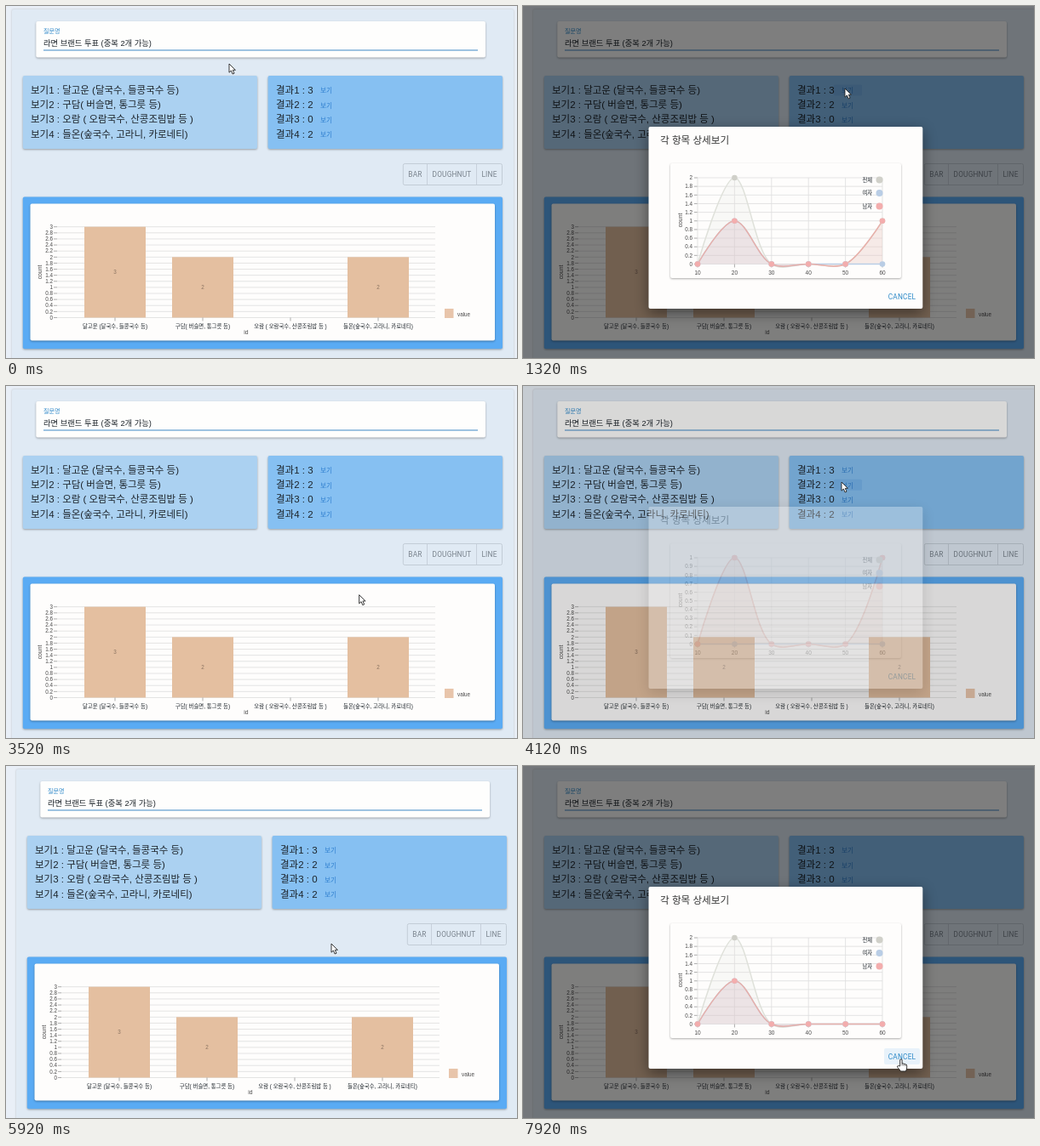
Animation, 600 px wide and 414 px high, one loop 8000 ms. Source, as an HTML page:

```html
<!DOCTYPE html>
<html lang="ko">
<head>
<meta charset="utf-8">
<title>투표 결과</title>
<style>
  html, body { margin: 0; width: 100%; height: 100%; overflow: hidden; background: #e9eff7; }
  svg { display: block; width: 600px; height: 414px; }
  text { font-family: "Liberation Sans", "Noto Sans CJK KR", "Noto Sans CJK JP", sans-serif; fill: #1d242b; }
  .num { fill: #4a4a4a; }
  .value { fill: #8d7562; }
  .btn { font-family: Roboto, sans-serif; letter-spacing: .2px; fill: #78828c; }
  .link { fill: #2f7fcf; }
  .blue { fill: #2a86c8; }
  .mid { text-anchor: middle; }
  .end { text-anchor: end; }
  .card { filter: drop-shadow(0 1px 1px rgba(0, 0, 0, .32)); }
  .paper { filter: drop-shadow(0 5px 8px rgba(0, 0, 0, .45)); }
  .soft { filter: drop-shadow(0 0 1px rgba(0, 0, 0, .2)); }
</style>
</head>
<body>
<svg viewBox="0 0 600 414">
  <g id="page"></g>
  <rect id="backdrop" width="600" height="414" opacity="0"/>
  <g id="dialog"></g>
  <g id="arrow">
    <path d="M0 0V10.2L2.4 8L4.1 12L6 11.2L4.3 7.3H7.4Z" fill="#fff" stroke="#222" stroke-width=".9" stroke-linejoin="round"/>
  </g>
  <g id="hand">
    <path d="M-1.3 8V1A1.2 1.2 0 0 1 1.1 1V5Q2.6 4.3 3.1 5.5Q4.6 4.9 5.1 6Q6.6 5.7 6.7 7.3V10Q6.5 12 5.4 14H-.6Q-2 11.6-4.4 9.2Q-4.9 7.6-3.3 7.6Z" fill="#fff" stroke="#222" stroke-width=".9" stroke-linejoin="round"/>
    <path d="M1.1 5V7.5M3.1 5.5V7.8M5.1 6V8" stroke="#222" stroke-width=".6"/>
  </g>
</svg>
<script>
const $ = id => document.getElementById(id);
const range = n => [...Array(n).keys()];
const text = (x, y, size, str, cls = '', more = '') =>
  `<text x="${x}" y="${y}" font-size="${size}" class="${cls}" ${more}>${str}</text>`;
const rect = (x, y, w, h, fill, more = '') =>
  `<rect x="${x}" y="${y}" width="${w}" height="${h}" fill="${fill}" ${more}/>`;
const line = (x1, y1, x2, y2, color, width = .85) =>
  `<path d="M${x1} ${y1}L${x2} ${y2}" stroke="${color}" stroke-width="${width}"/>`;
const dot = (x, y, r, fill) => `<circle cx="${x}" cy="${y}" r="${r}" fill="${fill}"/>`;
const side = (x, y) => text(0, 0, 6.8, 'count', 'num mid', `transform="translate(${x} ${y}) rotate(-90)"`);

const GRID = '#dfdfdf', TICK = '#8a8a8a', CARD = 'class="card" rx="2"';
const ROW = 17.3;
const options = [
  '달고운 (달국수, 들콩국수 등)',
  '구담( 버슬면, 통그릇 등)',
  '오람 ( 오람국수, 산콩조림밥 등 )',
  '들온(숲국수, 고라니, 카로네티)'
];
const votes = [3, 2, 0, 2];

function barChart() {
  const base = 366.5, unit = 35.6;
  let s = rect(28.5, 232.6, 545.5, 161, '#fefdfc', CARD);
  for (const i of range(16)) {
    const y = base - i * unit / 5;
    s += line(60, y, 504, y, GRID) + line(56, y, 60, y, TICK, .7);
    s += text(55, y + 2.2, 6.3, +(i / 5).toFixed(1), 'num end');
  }
  votes.forEach((v, i) => {
    const x = 128 + 103 * i;
    if (v) {
      s += rect(x - 36, base - v * unit, 72, v * unit, '#e4bfa0');
      s += text(x, base - v * unit / 2 + 2.2, 6.3, v, 'value mid');
    }
    s += line(x, base, x, base + 4, TICK, .7) + text(x, 379, 6.4, options[i], 'mid');
  });
  return s + side(42, 313) + text(282, 386, 6.8, 'id', 'num mid')
    + rect(515, 356, 10.5, 11, '#e8c5ab') + text(530, 364.5, 6.3, 'value', 'num');
}

function buildPage() {
  let s = rect(7, 4, 589, 420, '#e0eaf4', 'class="soft" rx="2"');
  s += rect(35.3, 18, 527.7, 42.6, '#fefefd', CARD);
  s += text(44, 32, 7, '질문명', 'blue') + text(44, 47.1, 9.3, '라면 브랜드 투표 (중복 2개 가능)');
  s += line(44, 52, 554, 52, '#3f88c5', 1);
  s += rect(19.8, 82, 275.2, 86, '#abd1f1', CARD) + rect(307.6, 82, 275.4, 86, '#86c0f2', CARD);
  s += rect(360, 93, 33, 13, '#2a78d2', 'id="hover" rx="1.5" opacity="0"');
  options.forEach((o, i) => {
    const y = 102.7 + ROW * i;
    s += text(29, y, 11.5, `보기${i + 1} : ${o}`);
    s += text(317, y, 11.5, `결과${i + 1} : ${votes[i]}`);
    s += text(376, y - .3, 7.6, '보기', 'link mid');
  });
  s += rect(466.3, 185.5, 116.2, 25, 'none', 'stroke="#c2ccd6" rx="2"');
  s += line(494.5, 186, 494.5, 210, '#c2ccd6') + line(552.5, 186, 552.5, 210, '#c2ccd6');
  s += text(480.5, 201, 8.3, 'BAR', 'btn mid') + text(523.5, 201, 8.3, 'DOUGHNUT', 'btn mid')
    + text(567.5, 201, 8.3, 'LINE', 'btn mid');
  return s + rect(19.8, 224.4, 563.2, 178.8, '#5aabf4', CARD) + barChart();
}

const X0 = 205, STEP = 43.4, Y0 = 303.5, HEIGHT = 101.5;

// Centripetal Catmull-Rom spline as cubic segments
function spline(pts) {
  const gap = (a, b) => Math.sqrt(Math.hypot(b[0] - a[0], b[1] - a[1]));
  const handle = (p, q, r) => {
    if (!r) return p;
    const a = gap(r, p), b = gap(p, q), n = 3 * a * (a + b);
    return [0, 1].map(k =>
      (p[k] * (2 * a * a + 3 * a * b + b * b) - r[k] * b * b + q[k] * a * a) / n);
  };
  return 'M' + pts[0] + pts.slice(1).map((q, i) =>
    `C${handle(pts[i], q, pts[i - 1])} ${handle(q, pts[i], pts[i + 2])} ${q}`).join('');
}

const series = [
  { name: '전체', dot: '#d0d0c9', line: '#dfe1da' },
  { name: '여자', dot: '#b9cde5', line: '#b9cde5' },
  { name: '남자', dot: '#f3adad', line: '#e9b0aa' }
];
// Counts at ages 20 and 60; the other ages are zero
const details = [
  { top: 2, at: [[2, 1], [1, 0], [1, 1]] },
  { top: 1, at: [[1, 1], [0, 0], [1, 1]] },
  { top: 2, at: [[2, 0], [1, 0], [1, 0]] }
];

function lineChart({ top, at }) {
  let s = '', areas = '', lines = '', dots = '';
  for (const i of range(11)) {
    const y = Y0 - i * HEIGHT / 10;
    s += line(X0, y, 422, y, GRID) + line(201, y, X0, y, TICK, .7);
    s += text(199, y + 2.2, 6.3, +(i * top / 10).toFixed(1), 'num end');
  }
  for (const i of range(6)) {
    const x = X0 + i * STEP;
    s += line(x, Y0 - HEIGHT, x, Y0, GRID) + line(x, Y0, x, Y0 + 4, TICK, .7);
    s += text(x, 316, 6.5, 10 * (i + 1), 'num mid');
  }
  at.forEach(([a, b], k) => {
    const pts = [0, a, 0, 0, 0, b].map((v, i) => [X0 + i * STEP, Y0 - v / top * HEIGHT]);
    const d = spline(pts), c = series[k];
    areas += `<path d="${d}L422 ${Y0}L${X0} ${Y0}Z" fill="${c.line}" opacity=".2"/>`;
    lines += `<path d="${d}" fill="none" stroke="${c.line}" stroke-width="1.5"/>`;
    dots += pts.map(p => dot(...p, 3.3, c.dot)).join('');
  });
  s += areas + lines + dots + side(187, 252);
  series.forEach((c, k) => {
    const y = 204.5 + 15.5 * k;
    s += dot(418.5, y, 4, c.dot) + text(410, y + 2.3, 6.3, c.name, 'end');
  });
  return s;
}

function buildDialog() {
  return rect(147.5, 142, 321.8, 214, '#fefdfc', 'class="paper" rx="2"')
    + text(161, 162.1, 11.6, '각 항목 상세보기', '', 'style="fill:#333"')
    + rect(173, 185, 271, 135, '#fefdfc', CARD)
    + details.map(d => `<g class="chart">${lineChart(d)}</g>`).join('')
    + rect(424, 332, 42, 19, '#e8f2fa', 'id="cancel" rx="2"')
    + text(445, 345, 8.3, 'CANCEL', 'btn mid', 'style="fill:#2d8ac8"');
}

$('page').innerHTML = buildPage();
$('dialog').innerHTML = buildDialog();
const charts = document.querySelectorAll('.chart');

const LOOP = 8000, ENTER = 225, LEAVE = 195;
// Open time, close time of each dialog
const windows = [[1060, 3300], [4038, 5725], [6473, 9000]];
// Time, x, y of the pointer
const path = [
  [0, 262, 68], [200, 262, 68], [900, 378, 97], [1900, 378, 97], [2700, 443, 338],
  [3300, 443, 338], [3800, 374, 113], [4600, 374, 113], [5300, 443, 340], [5700, 443, 340],
  [5920, 382, 209], [6200, 378, 154], [6800, 378, 154], [7600, 444, 345], [LOOP, 444, 345]
];
const clamp = u => Math.min(1, Math.max(0, u));
const ease = u => u * u * (3 - 2 * u);

function pointer(t) {
  const i = path.findIndex(k => k[0] > t);
  const [t0, x0, y0] = path[i - 1], [t1, x1, y1] = path[i];
  const u = ease((t - t0) / (t1 - t0));
  return [x0 + (x1 - x0) * u, y0 + (y1 - y0) * u];
}

function draw(t) {
  const open = windows.findIndex(([a, b]) => t >= a && t <= b + LEAVE);
  let fade = 0;
  if (open >= 0) {
    const [a, b] = windows[open];
    fade = t < b ? ease(clamp((t - a) / ENTER)) : 1 - ease(clamp((t - b) / LEAVE));
  }
  $('page').setAttribute('transform', `translate(${open < 0 ? 0 : 5} 0)`);
  $('backdrop').setAttribute('opacity', fade / 2);
  $('dialog').setAttribute('opacity', fade);
  charts.forEach((c, i) => c.setAttribute('display', i === open ? 'inline' : 'none'));

  const [x, y] = pointer(t);
  const row = Math.round((y - 99) / ROW);
  const onLink = row >= 0 && row < 4 && x > 362 && x < 396 && Math.abs(y - 99 - row * ROW) < 7;
  const onCancel = fade > 0 && x > 424 && x < 466 && y > 332 && y < 351;
  $('hover').setAttribute('y', 92.5 + row * ROW);
  $('hover').setAttribute('opacity', onLink ? .15 : 0);
  $('cancel').setAttribute('opacity', onCancel ? 1 : 0);

  const hand = onCancel || (onLink && open < 0);
  $('hand').setAttribute('display', hand ? 'inline' : 'none');
  $('arrow').setAttribute('display', hand ? 'none' : 'inline');
  $(hand ? 'hand' : 'arrow').setAttribute('transform', `translate(${x} ${y})`);
}

const snap = t => t - t % 200 + (t % 200 < 120 ? 0 : 120);
const start = performance.now();
function tick() {
  draw(snap((performance.now() - start) % LOOP));
  requestAnimationFrame(tick);
}
tick();
</script>
</body>
</html>
```
